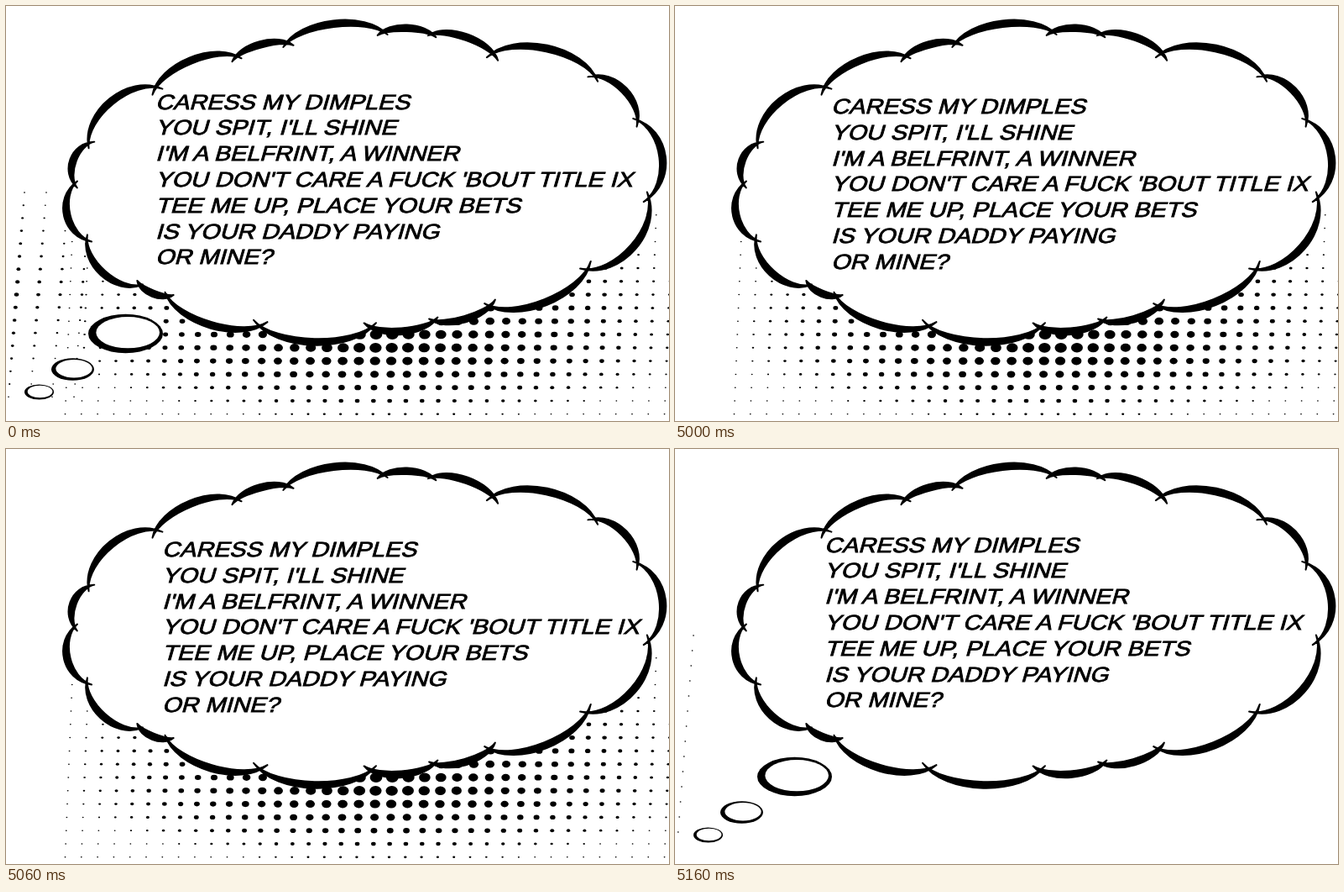
An HTML page for the animation above (5.2 s loop, 790 px wide and 494 px high).

```html
<!DOCTYPE html>
<html lang="en">
<head>
<meta charset="utf-8">
<title>Thought bubble</title>
<style>
  html, body { margin: 0; width: 100%; height: 100%; overflow: hidden; background: #fff; }
  svg { display: block; }
  text { font: 25px "Liberation Sans", Arial, sans-serif; stroke: #000; stroke-width: .8; }
</style>
</head>
<body>
<svg width="790" height="494" viewBox="0 0 790 494">
  <g id="halftone"></g>
  <g id="sideDots"></g>
  <g id="column"></g>
  <g id="cloud"></g>
  <g id="bubbles"></g>
  <g id="words"></g>
</svg>
<script>
const layer = id => document.getElementById(id);
const fill = (id, html) => { layer(id).innerHTML = html; };
const oval = (x, y, rx, ry, color = '#000') =>
  `<ellipse cx="${x}" cy="${y}" rx="${rx}" ry="${ry}" fill="${color}"/>`;
const dot = (x, y, r) => oval(x, y, Math.max(.9, r), Math.max(.9, r) * .82);

// Notches where the cloud's lobes meet, clockwise from the left
const notches = [
  [104,165], [181,103], [274,65], [338,48], [447,35], [508,37], [581,63],
  [697,88], [748,140], [759,227], [689,307], [578,351], [509,371], [432,377],
  [304,374], [197,343], [159,328], [101,276], [86,213]
];

// Each lobe overshoots its notches a little and swells more near the cloud's sides
function makeLobe([x, y], i) {
  const [u, v] = notches[(i + 1) % notches.length];
  const dx = u - x, dy = v - y, length = Math.hypot(dx, dy);
  const side = ((x + u) / 2 - 427) / 345;
  const height = length * (.22 + .19 * side ** 4);
  const at = (s, h) => `${x + dx * s + dy / length * h},${y + dy * s - dx / length * h} `;
  const edge = (from, to, h) => `C${at(from, h)}${at(to, h)}`;
  const outer = at(-.07, 0) + edge(.13, .87, height * 4 / 3) + at(1.07, 0);
  return { outer, crescent: `M${outer}${edge(.87, .13, height * 4 / 3 - 10)}${at(-.07, 0)}Z` };
}
const lobes = notches.map(makeLobe);
fill('cloud', `<path fill="#fff" d="M${lobes.map(l => l.outer).join('L')}Z"/>
  <path stroke="#000" stroke-width="2" stroke-linejoin="round" d="${lobes.map(l => l.crescent).join('')}"/>`);

const bubble = (x, y, r) =>
  oval(x, y, r, r * .52) + oval(x + r * .06, y - r * .03, r * .85, r * .42, '#fff');
fill('bubbles', bubble(142.5, 390, 44.5) + bubble(79.5, 432.5, 25.5) + bubble(39.5, 459.5, 17.5));

// Halftone: dots shrink away from the shadow's centre, faster downwards
let dots = '';
for (let row = -9; row <= 6; row++) {
  for (let col = -19; col <= 18; col++) {
    const dy = row * 15.8, y = 391 + dy, x = 441 + col * 19.3 - dy * .04;
    if (y < 278 && x < 400) continue;
    const fade = Math.hypot((x - 450) / 430, (y - 400) / (y > 400 ? 110 : 250));
    dots += dot(x, y, 7.7 * (1 - fade));
  }
}
fill('halftone', dots);

// Slanted columns of dots at the left edge
function slanted(columns, step, size) {
  let html = '';
  for (let y = 222; y < 470; y += step) {
    for (let col = 0; col < columns; col++) {
      html += dot(22 + col * 26 - (y - 222) * .078, y, size(y, col));
    }
  }
  return html;
}
fill('sideDots', slanted(4, 15.2, (y, col) => 2.8 - Math.abs(y - 340) / 65 - col * .35));
fill('column', slanted(1, 18, () => .9));

const lines = [
  'CARESS MY DIMPLES',
  "YOU SPIT, I'LL SHINE",
  "I'M A BELFRINT, A WINNER",
  "YOU DON'T CARE A FUCK 'BOUT TITLE IX",
  'TEE ME UP, PLACE YOUR BETS',
  'IS YOUR DADDY PAYING',
  'OR MINE?'
];
fill('words', lines.map((line, i) =>
  `<text transform="translate(178 ${122.5 + i * 30.8}) skewX(-16) scale(1.15 1)">${line}</text>`).join(''));

const show = (id, on) => layer(id).setAttribute('visibility', on ? 'visible' : 'hidden');
const start = performance.now();
function draw() {
  const t = Math.max(0, performance.now() - start) % 5200;
  const full = t < 5000, jolt = !full && t < 5100;
  show('halftone', full || jolt);
  show('sideDots', full);
  show('column', !full && !jolt);
  show('bubbles', !jolt);
  layer('words').setAttribute('transform', jolt ? 'translate(8 5.5)' : '');
  requestAnimationFrame(draw);
}
draw();
</script>
</body>
</html>
```
